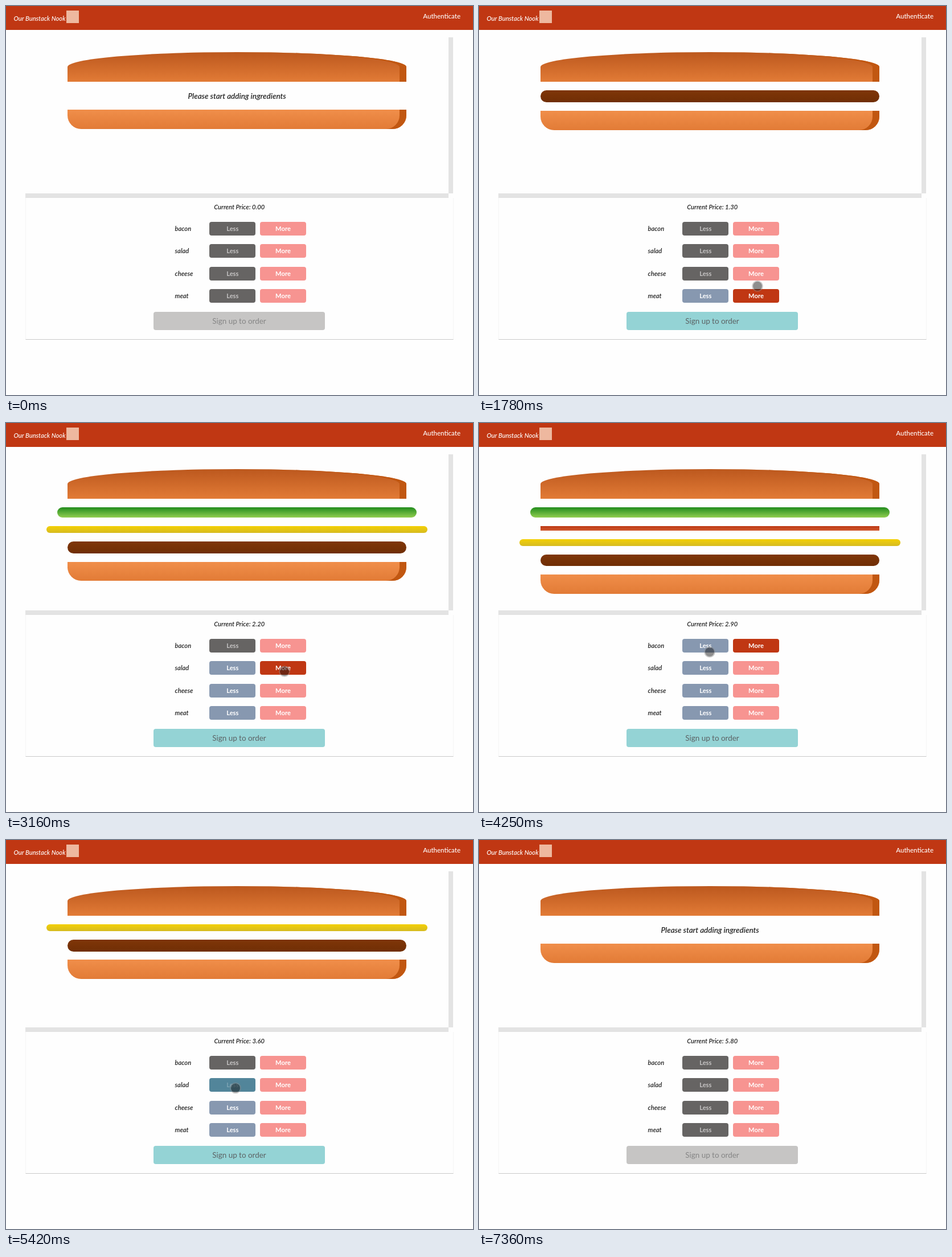
These frames come from a looping animation (820 by 683 pixels, 7990 ms). An HTML page:

```html
<!DOCTYPE html>
<html lang="en">
<head>
<meta charset="utf-8">
<title>Order builder</title>
<style>
html, body { margin: 0; width: 100%; height: 100%; overflow: hidden; background: #fefefe; }
#stage { position: relative; width: 820px; height: 683px; overflow: hidden; background: #fefefe; font: 11.2px Lato, sans-serif; color: #222; }
#stage div { position: absolute; box-sizing: border-box; white-space: nowrap; }
.header { left: 0; top: 0; width: 820px; height: 42px; background: #c03713; color: #fff; }
.brand { left: 13.5px; top: 12px; line-height: 20px; font-style: italic; font-weight: 500; }
.logo { left: 106px; top: 8px; width: 22px; height: 22px; background: #eeb89f; }
.login { right: 22px; top: 8px; line-height: 20px; font-size: 11.5px; font-weight: 500; }
.bar-v { left: 777px; top: 55px; width: 8px; height: 274px; background: #e3e3e3; }
.bar-h { left: 34px; top: 329px; width: 743px; height: 8px; background: #e3e3e3; }
.panel { left: 33.5px; top: 336.5px; width: 752px; height: 249.5px; border: solid #f5f5f5; border-width: 0 1px; border-bottom: 1.6px solid #c9c9c9; }
.strong { font-weight: 600; font-style: italic; }
.centered { text-align: center; }
#message { left: 205.6px; width: 400px; top: 148px; line-height: 20px; font-size: 13.44px; }
#price { left: 309.7px; width: 200px; top: 342.5px; line-height: 20px; }
.label { left: 296.6px; line-height: 24px; }
.button { width: 81px; height: 24px; line-height: 24px; border-radius: 4px; font-weight: 700; text-align: center; color: #fff; }
.less { left: 357.3px; }
.more { left: 446px; }
#order { left: 259px; top: 537px; width: 301px; height: 32px; line-height: 32px; border-radius: 4px; font-size: 13.44px; text-align: center; }
.bun { left: 108px; width: 595px; box-shadow: inset -12px 0 #c15711; }
#lid { top: 81px; height: 52px; border-radius: 50% 50% 0 0; background: linear-gradient(#bc581e, #e27b36); }
#base { height: 33.8px; border-radius: 0 0 24px 24px; background: linear-gradient(#f08e4a, #e27b36); }
#cursor { left: -8px; top: -8px; width: 16px; height: 16px; border-radius: 50%; background: rgba(20,20,20,.48); box-shadow: 0 0 0 1.8px rgba(140,140,140,.45); }
</style>
</head>
<body>
<div id="stage">
  <div class="header">
    <div class="brand">Our Bunstack Nook</div>
    <div class="logo"></div>
    <div class="login">Authenticate</div>
  </div>
  <div class="bar-v"></div>
  <div class="bar-h"></div>
  <div class="panel"></div>
  <div id="lid" class="bun"></div>
  <div id="message" class="strong centered">Please start adding ingredients</div>
  <div id="base" class="bun"></div>
  <div id="price" class="strong centered"></div>
  <div id="order">Sign up to order</div>
</div>
<script>
const LOOP = 7990, GAP = 14.86, STACK_TOP = 133.4, STACK_HEIGHT = 260, STACK_WIDTH = 743.5, MID_X = 405.5;
const stage = document.getElementById('stage');
const byId = id => document.getElementById(id);
const px = n => n + 'px';

function add(className, text = '', style = {}) {
  const el = document.createElement('div');
  el.className = className;
  el.textContent = text;
  Object.assign(el.style, style);
  return stage.appendChild(el);
}

// Width and height are shares of the stack area.
const bacon = { name: 'bacon', cost: 0.7, width: 0.8, height: 0.03, radius: 0, colors: '#bd3813, #d0592f' };
const salad = { name: 'salad', cost: 0, width: 0.85, height: 0.07, radius: 16, colors: '#228c1d, #91ce50' };
const cheese = { name: 'cheese', cost: 0.9, width: 0.9, height: 0.045, radius: 16, colors: '#f4d004, #d6bb22' };
const meat = { name: 'meat', cost: 1.3, width: 0.8, height: 0.08, radius: 12, colors: '#7f3608, #702e05' };
const rows = [bacon, salad, cheese, meat];
const stack = [salad, bacon, cheese, meat];

rows.forEach((row, i) => {
  row.index = i;
  row.y = 391 + 39.45 * i;
  const top = px(row.y - 12), width = row.width * STACK_WIDTH;
  add('label strong', row.name, { top });
  row.less = add('button less', 'Less', { top });
  row.more = add('button more', 'More', { top });
  row.layer = add('layer', '', {
    left: px(MID_X - width / 2), width: px(width), height: px(row.height * STACK_HEIGHT),
    borderRadius: px(row.radius), background: `linear-gradient(${row.colors})`
  });
});
const cursor = add('cursor');
cursor.id = 'cursor';

// The pointer travels in legs; the ones that end on a button also click it.
const leg = (at, x, y, travel) => ({ at, x, y, travel });
const more = (at, row) => ({ ...leg(at, 489, 397 + 39 * row.index, 160), row, amount: 1 });
const less = (at, row) => ({ ...leg(at, 405 - 2 * row.index, 402 + 33.5 * row.index, 160), row, amount: 0 });
const legs = [
  leg(0, 557, 652, 1), leg(310, 429, 495, 370),
  more(850, meat), more(1690, cheese), more(2780, salad), more(3620, bacon),
  less(4080, bacon), less(4960, salad), less(5440, cheese), less(5920, meat),
  leg(6540, 750, 160, 500), leg(7200, 731, 42, 150)
];
const APPEAR = 310, VANISH = 7355, HOVER_DELAY = 150;

// Adding clicks soon after setting off, removing clicks just before moving on.
legs.forEach((l, i) => { l.click = l.amount ? l.at + 370 : i + 1 < legs.length ? legs[i + 1].at - 100 : LOOP; });

function pointAt(t) {
  const i = Math.max(1, legs.filter(l => l.at <= t).length - 1);
  const from = legs[i - 1], to = legs[i];
  const k = Math.min(1, Math.max(0, (t - to.at) / to.travel));
  return { x: from.x + (to.x - from.x) * k, y: from.y + (to.y - from.y) * k };
}

function paint(el, background, color) {
  el.style.background = background;
  el.style.color = color;
}

const show = (el, on) => { el.style.visibility = on ? 'visible' : 'hidden'; };

function render(t) {
  const clicks = legs.filter(l => l.row && l.click <= t);
  const last = clicks[clicks.length - 1];
  const amounts = new Map(clicks.map(c => [c.row, c.amount]));
  const price = clicks.reduce((sum, c) => sum + c.row.cost, 0);

  const visible = t >= APPEAR && t < VANISH;
  const tip = pointAt(t), hover = pointAt(t - HOVER_DELAY);
  cursor.style.transform = `translate(${tip.x}px, ${tip.y}px)`;
  show(cursor, visible);

  for (const row of rows) {
    const on = amounts.get(row);
    const over = left => visible && Math.abs(hover.y - row.y) < 12 && hover.x > left && hover.x < left + 81;
    const overLess = over(357);
    const focused = last && last.row === row && last.amount;
    paint(row.less, overLess ? '#52859a' : on ? '#8798b0' : '#666463',
      on ? '#fff' : overLess ? '#7fa5b4' : '#c6c4c4');
    paint(row.more, over(446) || focused ? '#c03713' : '#f79491', '#fff');
  }

  let top = STACK_TOP + GAP;
  for (const row of stack) {
    const on = amounts.get(row);
    show(row.layer, on);
    row.layer.style.top = px(top);
    if (on) top += row.height * STACK_HEIGHT + GAP;
  }
  const filled = stack.some(row => amounts.get(row));
  byId('base').style.top = px(filled ? top : 182);
  show(byId('message'), !filled);
  byId('price').textContent = 'Current Price: ' + price.toFixed(2);
  paint(byId('order'), filled ? '#94d3d5' : '#c6c5c4', filled ? '#5c6264' : '#858585');
}

const began = performance.now();
function tick() {
  render((performance.now() - began) % LOOP);
  requestAnimationFrame(tick);
}
tick();
</script>
</body>
</html>
```
